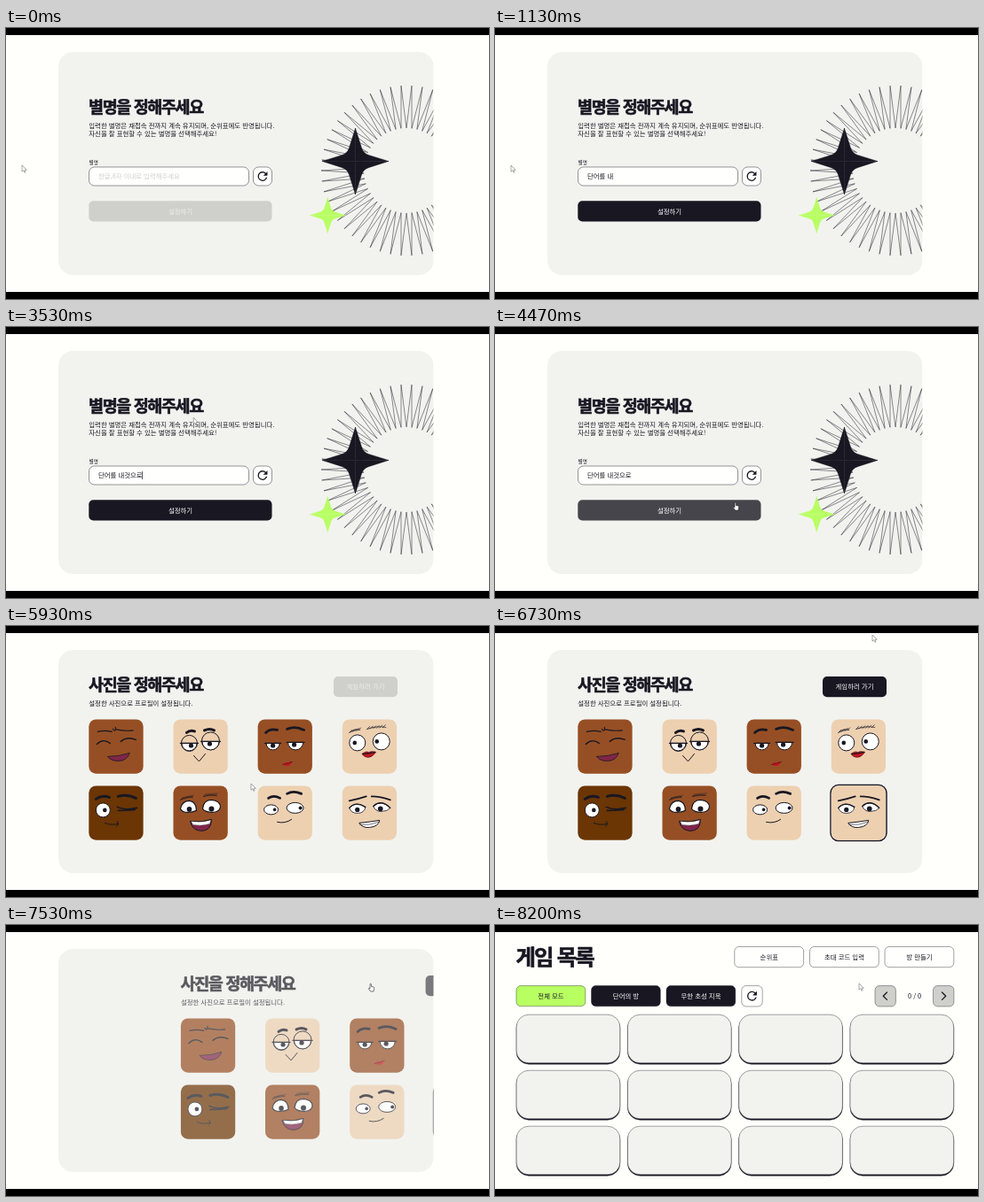
An HTML page that plays this animation: 544x306 px, repeating every 8670 ms.

```html
<!DOCTYPE html>
<html lang="ko">
<head>
<meta charset="utf-8">
<style>
html, body { margin: 0; width: 100%; height: 100%; overflow: hidden; background: #000; }
svg { display: block; width: 100vw; height: 100vh; }
text { font: 7.4px "Noto Sans CJK KR", "Noto Sans CJK", "Noto Sans", sans-serif; white-space: pre; }
.title { font-size: 18.5px; font-weight: 900; letter-spacing: -.075em; stroke-width: .6; stroke-linejoin: round; }
.big { font-size: 24.4px; }
.small { font-size: 5.6px; }
</style>
</head>
<body>
<svg id="stage" viewBox="0 0 544 306"></svg>
<script>
const LOOP = 8670, EXIT = 308, EXIT1 = 4825, EXIT2 = 7361, TRAVEL = 340;
const INK = '#181722', PAPER = '#fffffb', CARD = '#f2f3ef', LIME = '#b8ff62', GREY = '#cfd0cb';
const BROWN = '#964f24', TAN = '#edd0b0', DARK = '#6b3504', RED = '#c4161f', WINE = '#81254b';

// Drawing helpers
const rect = (x, y, w, h, r, fill, more = '') =>
  `<rect x="${x}" y="${y}" width="${w}" height="${h}" rx="${r}" fill="${fill}" ${more}/>`;
const edge = (w = .45) => `stroke="${INK}" stroke-width="${w}"`;
const text = (x, y, s, fill = INK, more = '') => `<text x="${x}" y="${y}" fill="${fill}" ${more}>${s}</text>`;
const mid = 'text-anchor="middle"';
const title = (x, y, s, cls = '') => text(x, y, s, INK, `class="title ${cls}" stroke="${INK}"`);
const shape = (d, fill, w = .8) => `<path d="${d}" fill="${fill}" ${edge(w)}/>`;
const line = (d, w = 1) => `<path d="${d}" fill="none" ${edge(w)} stroke-linecap="round" stroke-linejoin="round"/>`;
const star = (x, y, r, fill) => {
  const arm = a => `<path transform="rotate(${a})" d="M0 0V-1L.19 -.4Q.24 -.24 .4 -.19L1 0Z"/>`;
  return `<g transform="translate(${x} ${y}) scale(${r})" fill="${fill}" stroke="${fill}" stroke-width=".01">
    ${[0, 90, 180, 270].map(arm).join('')}</g>`;
};
const refresh = (x, y) => `<path transform="translate(${x} ${y}) scale(.68) translate(-12 -12)" fill="${INK}"
  d="M17.65 6.35A7.96 7.96 0 0 0 12 4a8 8 0 1 0 7.73 10h-2.08A6 6 0 1 1 12 6c1.66 0 3.14.69 4.22 1.78L13 11h7V4z"/>`;
const burst = (x, y, n) => {
  const pts = Array.from({ length: n * 2 }, (_, i) => {
    const a = (i + 1) * Math.PI / n - Math.PI / 2, r = i % 2 ? 48 : 96;
    return `${(x + r * Math.cos(a)).toFixed(1)},${(y + r * Math.sin(a)).toFixed(1)}`;
  });
  return `<polygon points="${pts.join(' ')}" fill="none" ${edge(.5)}/>`;
};

// Face parts
const dot = (x, y, r) => `<circle cx="${x}" cy="${y}" r="${r}" fill="${INK}"/>`;
const eye = (x, y, rx, ry, px, pr = 2.3) =>
  `<ellipse cx="${x}" cy="${y}" rx="${rx}" ry="${ry}" fill="#fff" ${edge(1)}/>` + dot(px, y, pr);
const lidded = (x, y, r, px) =>
  shape(`M${x - r} ${y}A${r} ${r} 0 0 0 ${x + r} ${y}Z`, '#fff', 1) + dot(px, y + 2.6, 2.6) +
  line(`M${x - r - 1.5} ${y}H${x + r + 1.5}`, 1.3);
const hairs = (x1, y1, x2, y2) => {
  let d = `M${x1} ${y1}Q${(x1 + x2) / 2} ${Math.min(y1, y2) - 2} ${x2} ${y2}`;
  for (let i = 0; i < 6; i++) {
    const k = i / 6;
    d += `M${x1 + (x2 - x1) * k} ${y1 + (y2 - y1) * k}l3 -3`;
  }
  return line(d, .7);
};

const faces = [
  [BROWN, line('M10 14Q18 12 26 14M31 11.5Q40 13.5 50 12.5M27 11l2 2M30 9v3', 1.1) +
    line('M9 28Q16 21 24 27M36 25Q43 19 53 23', 1.4) +
    shape('M21 42Q34 42 46 38Q43 47 33 47Q25 47 21 42', WINE)],
  [TAN, line('M15 15Q19 11.5 24 13.5M35 12.5Q41 9.5 46 12.5', 3) +
    `<circle cx="18" cy="27" r="9" fill="${TAN}" ${edge(1)}/><circle cx="42" cy="24.5" r="10" fill="${TAN}" ${edge(1)}/>` +
    lidded(18, 27, 8.5, 20) + lidded(42, 25, 9.5, 41) + line('M23 41L29 47.5L36 39', 1)],
  [BROWN, line('M9 15Q14 10 22 12M33 11Q42 7 52 12', 2.8) +
    lidded(17, 27, 7.5, 17) + lidded(42.5, 26, 8.5, 41) +
    `<path d="M27.5 51Q32 47.5 34 49Q37 47 39 48Q36 53 32 52.5Z" fill="${RED}"/>` + line('M28 51Q33 50 39 48', .5)],
  [TAN, hairs(8, 15, 20, 12) + hairs(28, 11, 49, 9) +
    eye(17, 26.5, 9, 9, 14) + eye(44, 25, 9.5, 9.5, 39) +
    shape('M22 39Q27 35 30 37Q33 35 38 37Q34 43 29 43Q25 43 22 39Z', RED, .4) + line('M23 39Q30 39 37 37', 1.2)],
  [DARK, line('M8 15Q15 10 23 13M33 12Q43 9 53 14', 3) +
    eye(16, 27.5, 8, 8, 18) + line('M32 24Q40 28 54 25M33 28Q42 28 52 27', 1.6) +
    line('M18 42Q24 45 33 43M32 40Q35 43 31 46', 1)],
  [BROWN, hairs(8, 16, 22, 13) + hairs(34, 12, 49, 11) +
    shape('M8 26Q10 17 18 17Q26 18 26 28Q22 30 16 30Q10 30 8 26Z', '#fff', 1.2) + dot(18, 26.5, 2.8) +
    shape('M33 26Q34 16 43 16Q53 17 53 24Q52 30 44 30Q36 30 33 26Z', '#fff', 1.2) + dot(43, 26, 3) +
    shape('M19 40Q32 42 43 38Q43 51 31 51Q21 50 19 40Z', WINE, 1) +
    shape('M20 40Q32 42 42.5 38.5L41 43Q31 46 22 44Z', '#fff', .4)],
  [TAN, line('M12 14Q18 10 25 14M33 9Q40 5 49 9', 2.8) +
    eye(15, 27, 8, 5.5, 19, 1.8) + eye(42, 25, 9.5, 6, 48, 2) + line('M22 41Q31 43 38 38', 1)],
  [TAN, line('M8 17Q18 15 27 12M33 12Q43 12 54 16', 1.8) +
    shape('M8 25Q15 17 26 24Q25 31 17 31Q10 31 8 25Z', '#fff', .8) + dot(17, 27, 2.6) +
    shape('M35 23Q44 15 54 25Q51 29 44 29Q37 29 35 23Z', '#fff', .8) + dot(43, 26, 2.8) +
    line('M8 25Q15 17 26 24M35 23Q44 15 54 25', 1.4) +
    shape('M19 42Q30 41 42 39Q41 46 31 47Q23 48 19 42Z', '#fff', 1) + line('M20 44Q31 45 41 41', .6)]
];

const nicknamePage = burst(451, 161, 50) + star(393.5, 150.5, 37.5, INK) + star(362.3, 211.5, 20.2, LIME) +
  title(93, 96.2, '별명을 정해주세요') +
  text(93.3, 112.7, '입력한 별명은 재접속 전까지 계속 유지되며, 순위표에도 반영됩니다.') +
  text(93.3, 122, '자신을 잘 표현할 수 있는 별명을 선택해주세요!') +
  text(93.5, 153.6, '별명', INK, 'class="small"') +
  rect(93.5, 157, 180, 21, 6, '#fffffd', edge()) + rect(278.5, 157, 21, 21, 6, '#fffffd', edge()) + refresh(289, 167.5) +
  text(104, 170, '', INK, 'id="typed"') + rect(0, 163, .7, 9, 0, INK, 'id="caret"') +
  rect(93.3, 195.3, 206.2, 23.2, 5, GREY, 'id="save"') + text(196.5, 209.6, '설정하기', '#fff', mid + ' id="saveText"');

const photoPage = title(93, 73.3, '사진을 정해주세요') +
  text(93.3, 89.5, '설정한 사진으로 프로필이 설정됩니다.') +
  rect(369, 57, 72, 23.3, 5, GREY, 'id="play"') + text(405, 71.2, '게임하러 가기', '#fff', mid + ' id="playText"') +
  rect(378, 179.6, 63, 63, 9, PAPER, edge(1.5) + ' id="pick"') +
  faces.map(([skin, art], i) =>
    `<g transform="translate(${93.3 + i % 4 * 95.15} ${i < 4 ? 105.4 : 180.4})">${rect(0, 0, 61.3, 61.3, 8, skin)}${art}</g>`).join('');

const button = (x, y, label, fill = '#fffffd', color = INK) =>
  rect(x, y, 77.8, 23.2, 5, fill, edge(.4)) + text(x + 39, y + 14.3, label, color, mid);
const square = (x, fill) => rect(x, 68.6, 23.4, 23.4, 5, fill, edge(.4));
const slots = Array.from({ length: 12 }, (_, i) => {
  const x = 24.1 + i % 4 * 125.3, y = 101.2 + Math.floor(i / 4) * 63;
  return rect(x, y + 1.2, 116.7, 54.8, 14, INK, edge(.4)) + rect(x, y, 116.7, 54.6, 14, CARD, edge(.4));
}).join('');
const listPage = title(23.5, 45.2, '게임 목록', 'big') +
  button(269.8, 24.5, '순위표') + button(354.5, 24.5, '초대 코드 입력') + button(439, 24.5, '방 만들기') +
  button(24, 68.6, '전체 모드', LIME) + button(108.5, 68.6, '단어의 방', INK, '#fff') +
  button(193, 68.6, '무한 초성 지옥', INK, '#fff') +
  square(277.8, '#fffffd') + refresh(289.5, 80.2) + square(428, GREY) + square(493.5, GREY) +
  line('M441.5 76l-4.2 4.2l4.2 4.2M503.5 76l4.2 4.2l-4.2 4.2', 1.3) +
  text(472.6, 82.8, '0 / 0', INK, mid) + slots;

const stage = document.getElementById('stage');
stage.innerHTML = `<clipPath id="clip">${rect(59, 27, 422.5, 252, 16, '#000')}</clipPath>
  ${rect(0, 8, 544, 290, 0, PAPER)}
  <g id="panel" clip-path="url(#clip)">${rect(59, 27, 422.5, 252, 16, CARD)}
    <g id="page1">${nicknamePage}</g><g id="page2">${photoPage}</g></g>
  <g id="page3">${listPage}</g>
  <g id="cursor"><path id="arrow" d="M0 0V7.2L1.7 5.7L2.9 8.3L4 7.8L2.9 5.3H5.2Z" fill="#fff" stroke="#555" stroke-width=".5"/>
  <path id="hand" d="M0 .7Q.7 -.2 1.4 .7V3.5L4 4Q4.8 4.4 4.6 5.6L4 9H.6L-1.6 6Q-1.5 4.7 0 5.7Z" fill="#fff" stroke="#222" stroke-width=".6"/></g>`;
const $ = Object.fromEntries([...stage.querySelectorAll('[id]')].map(e => [e.id, e]));

// Keystrokes as composed by the input method
const keys = [[70, 'ㄷ'], [130, '다'], [200, '단'],
  ...['단어', '단얼', '단어르', '단어를', '단어를 ㄴ', '단어를 내'].map((s, i) => [467 + i * 66.7, s]),
  ...['내', '낵', '내거', '내것', '내것ㅇ', '내것으', '내것을', '내것으로'].map((s, i) => [1530 + i * 66.7, '단어를 ' + s])];
const route = [[3330, 18, 155], [3560, 220, 100], [3780, 401, 79], [4110, 270, 198], [5250, 270, 198],
  [5520, 120, 130], [5740, 190, 195], [5930, 276, 178], [6130, 430, 230], [6300, 436, 236],
  [6420, 446, 240], [6730, 425, 10], [7000, 410, 66]];

const clamp = v => Math.max(0, Math.min(1, v));
const ramp = (t, start, span) => clamp((t - start) / span);
const mix = (a, b, k) => `rgb(${a.map((v, i) => Math.round(v + (b[i] - v) * k))})`;
const show = (el, on) => el.style.display = on ? '' : 'none';
const within = (p, x, y, w, h) => p[0] >= x && p[0] <= x + w && p[1] >= y && p[1] <= y + h;

function pointer(t) {
  const i = route.findIndex(p => p[0] > t);
  if (i < 0) return route.at(-1).slice(1);
  if (!i) return route[0].slice(1);
  const [a, b] = [route[i - 1], route[i]], k = ramp(t, a[0], b[0] - a[0]), e = k * k * (3 - 2 * k);
  return [a[1] + (b[1] - a[1]) * e, a[2] + (b[2] - a[2]) * e];
}

function paintButton(box, label, t, ready, hover) {
  const on = ramp(t, ready, 200), over = ramp(t, hover, 130);
  const dark = [24, 23, 34].map((v, i) => v + ([70, 69, 76][i] - v) * over);
  box.setAttribute('fill', mix([207, 208, 203], dark, on));
  label.setAttribute('fill-opacity', .65 + .35 * on);
}

function slide(page, t, start) {
  const p = ramp(t, start, EXIT) ** 2;
  page.setAttribute('transform', `translate(${TRAVEL * p} 0)`);
  page.setAttribute('opacity', 1 - p);
}

function typing(t) {
  const key = keys.findLast(k => k[0] <= t);
  const value = key ? key[1] : '';
  $.typed.textContent = value || '한글,8자 이내로 입력해주세요';
  $.typed.setAttribute('fill', value ? INK : '#cfcfcd');
  const width = [...value].reduce((w, c) => w + (c === ' ' ? .224 : .92) * 7.4, 0);
  $.caret.setAttribute('x', 103.9 + width);
  show($.caret, key && Math.floor((t - key[0] + 45) / 359) % 2 === 0);
}

function draw(now) {
  const t = now % LOOP, end1 = EXIT1 + EXIT, end2 = EXIT2 + EXIT;
  show($.page1, t < end1);
  show($.page2, t >= end1);
  show($.panel, t < end2);
  show($.page3, t >= end2);
  $.page3.setAttribute('opacity', ramp(t, end2 - 30, 160));
  slide($.page1, t, EXIT1);
  slide($.page2, t, EXIT2);
  typing(t);
  paintButton($.save, $.saveText, t, 90, 3990);
  paintButton($.play, $.playText, t, 6330, 6960);
  show($.pick, t >= 6330);

  const p = pointer(t);
  const link = t < end1 ? within(p, 93, 195, 206, 24)
    : t < end2 && (within(p, 369, 57, 72, 24) ||
      faces.some((_, i) => within(p, 93.5 + i % 4 * 95.15, i < 4 ? 105.5 : 180.5, 61, 61)));
  show($.hand, link);
  show($.arrow, !link);
  $.cursor.setAttribute('transform', `translate(${p})`);
  requestAnimationFrame(loop);
}

const begin = performance.now();
function loop() { draw(performance.now() - begin); }
loop();
</script>
</body>
</html>
```
